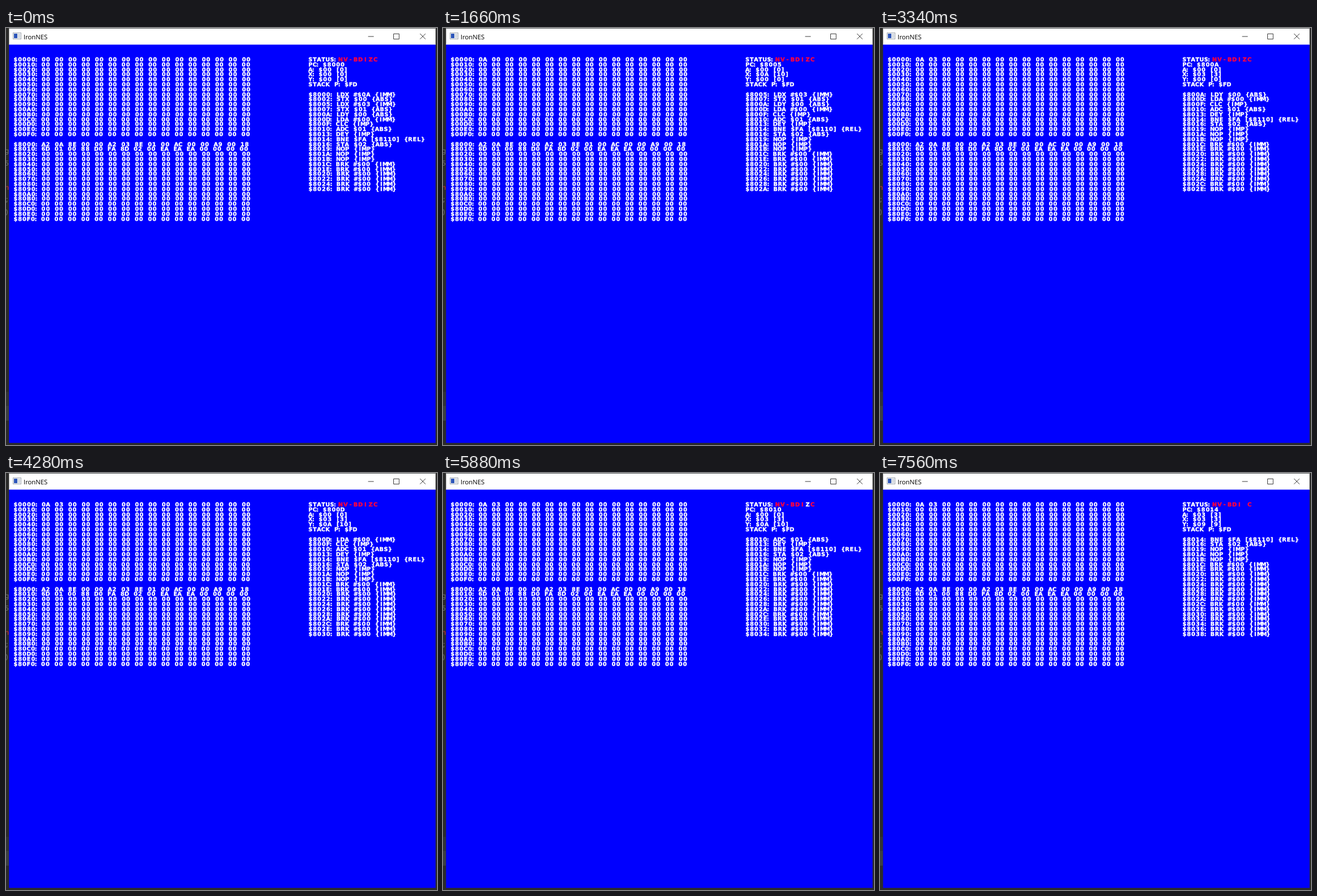
These frames come from a looping animation (760x737 px, 8 s). An HTML page:

```html
<!DOCTYPE html>
<html lang="en">
<head>
<meta charset="utf-8">
<title>IronNES</title>
<style>
  html, body { margin: 0; width: 100%; height: 100%; overflow: hidden; background: #2b2b2b; }
  svg { display: block; width: 760px; height: 737px; text-rendering: geometricPrecision; }
  .title { font: 11.3px "Open Sans", "Noto Sans", sans-serif; fill: #000; }
  .edge { font: 12px "Noto Sans Mono", monospace; fill: #73777b; }
  .edge .red { fill: #d0353f; }
  .screen text {
    font: bold 9.8px "DejaVu Sans", sans-serif;
    text-anchor: middle;
    fill: #fff;
    stroke: #fff;
    stroke-width: .4px;
  }
  .screen .off { fill: #ff0040; stroke: #ff0040; }
  .screen .none { visibility: hidden; }
</style>
</head>
<body>
<svg viewBox="0 0 760 737">
  <rect width="760" height="737" fill="#2b2b2b"/>
  <rect y="643" width="5" height="25" fill="#323436"/>
  <rect y="668" width="5" height="26" fill="#3c3f41"/>
  <g class="edge">
    <text x="-2" y="221">g</text>
    <text x="-2" y="243">5</text>
    <text x="-2" y="286" class="red">n</text>
    <text x="-2" y="307">;</text>
    <text x="-2" y="329">)</text>
  </g>
  <rect x="5.4" width="752.1" height="30" fill="#fff"/>
  <rect x="5.4" width="752.1" height="1" fill="#55585a"/>
  <rect x="5.4" y="29.4" width="752.1" height="703.9" fill="#00f"/>

  <rect x="12.5" y="8.5" width="14" height="11" fill="#f4f6f8" stroke="#a3a9b0"/>
  <rect x="14" y="10" width="6" height="8" fill="#2c55b8"/>
  <rect x="21" y="10" width="4" height="8" fill="#d5dae0"/>
  <text class="title" x="31" y="19.5">IronNES</text>
  <g fill="none" stroke="#222" stroke-width=".9">
    <path d="M638.5 15h10M683.5 10.3h9.700v9.300h-9.700z"/>
    <path d="M730 10l9.700 9.700m0-9.700l-9.700 9.700"/>
  </g>

  <g class="screen" id="screen"></g>
</svg>
<script>
const LOOP = 8000;
const STEPS = [0, 570, 1660, 2470, 3340, 4280, 5010, 5880, 6750, 7560];
const LEFT = 13.3, RIGHT = 533.3, TOP = 59, LINE = 8.8;

// Character advances; everything else is ADVANCE wide.
const ADVANCE = 7.85;
const NARROW = {
  ':': 2.4, '#': 6.1, '[': 6, ']': 6, '{': 7, '}': 7, '1': 7.5, A: 7.7,
  C: 7.2, D: 7.55, E: 7.5, F: 7, I: 7.3, L: 7.5, S: 7.7, T: 7.5
};

const PROGRAM = [
  [0x8000, 'LDX #$0A {IMM}'], [0x8002, 'STX $00 {ABS}'],
  [0x8005, 'LDX #$03 {IMM}'], [0x8007, 'STX $01 {ABS}'],
  [0x800A, 'LDY $00 {ABS}'], [0x800D, 'LDA #$00 {IMM}'],
  [0x800F, 'CLC {IMP}'], [0x8010, 'ADC $01 {ABS}'],
  [0x8013, 'DEY {IMP}'], [0x8014, 'BNE $FA [$8110] {REL}'],
  [0x8016, 'STA $02 {ABS}'], [0x8019, 'NOP {IMP}'],
  [0x801A, 'NOP {IMP}'], [0x801B, 'NOP {IMP}']
];
for (let addr = 0x801C; PROGRAM.length < 32; addr += 2) PROGRAM.push([addr, 'BRK #$00 {IMM}']);

const ROM = ('A2 0A 8E 00 00 A2 03 8E 01 00 AC 00 00 A9 00 18 ' +
  '6D 01 00 88 D0 FA 8D 02 00 EA EA EA').split(' ');

const screen = document.getElementById('screen');
const hex = (n, size) => n.toString(16).toUpperCase().padStart(size, '0');

// Adds an empty line of text and returns a function that sets it.
function addText(x, line) {
  const el = document.createElementNS('http://www.w3.org/2000/svg', 'text');
  el.setAttribute('y', (TOP + line * LINE).toFixed(2));
  screen.append(el);
  return str => {
    if (el.textContent === str) return el;
    let pen = x;
    const centres = [...str].map(ch => {
      const w = NARROW[ch] || ADVANCE;
      pen += w;
      return (pen - w / 2 - .4).toFixed(2);
    });
    el.setAttribute('x', centres.join(' '));
    el.textContent = str;
    return el;
  };
}

const column = (x, first, count) =>
  Array.from({ length: count }, (_, i) => addText(x, first + i));

const zeroPage = column(LEFT, 0, 16);
const romPage = column(LEFT, 17, 16);
const registers = column(RIGHT, 1, 5);
const listing = column(RIGHT, 7, 20);

addText(RIGHT, 0)('STATUS:');
const flags = [...'NV-BDIZC'].map((ch, i) => {
  const el = addText(586.4 + i * 8.85, 0)(ch);
  el.setAttribute('class', 'off');
  return el;
});
const zeroFlag = flags[6];

function dump(rows, base, bytes) {
  rows.forEach((set, r) => {
    const cells = Array.from({ length: 16 }, (_, c) => bytes[r * 16 + c] || '00');
    set('$' + hex(base + r * 16, 4) + ': ' + cells.join(' '));
  });
}

function show(step) {
  const a = step < 8 ? 0 : 3;
  const x = step < 1 ? 0 : step < 3 ? 10 : 3;
  const y = step < 5 ? 0 : step < 9 ? 10 : 9;
  const reg = (name, v) => `${name}: $${hex(v, 2)} [${v}]`;
  const lines = ['PC: $' + hex(PROGRAM[step][0], 4),
    reg('A', a), reg('X', x), reg('Y', y), 'STACK P: $FD'];
  registers.forEach((set, i) => set(lines[i]));
  listing.forEach((set, i) => {
    const [addr, code] = PROGRAM[step + i];
    set('$' + hex(addr, 4) + ': ' + code);
  });
  dump(zeroPage, 0, [step < 2 ? '00' : '0A', step < 4 ? '00' : '03']);
  zeroFlag.setAttribute('class', step < 6 ? 'off' : step < 8 ? 'on' : 'none');
}

dump(romPage, 0x8000, ROM);
let shown = 0;
show(0);

const start = performance.now();
function tick() {
  const t = (performance.now() - start) % LOOP;
  const step = STEPS.filter(s => s <= t).length - 1;
  if (step !== shown) show(shown = step);
  requestAnimationFrame(tick);
}
requestAnimationFrame(tick);
</script>
</body>
</html>
```
